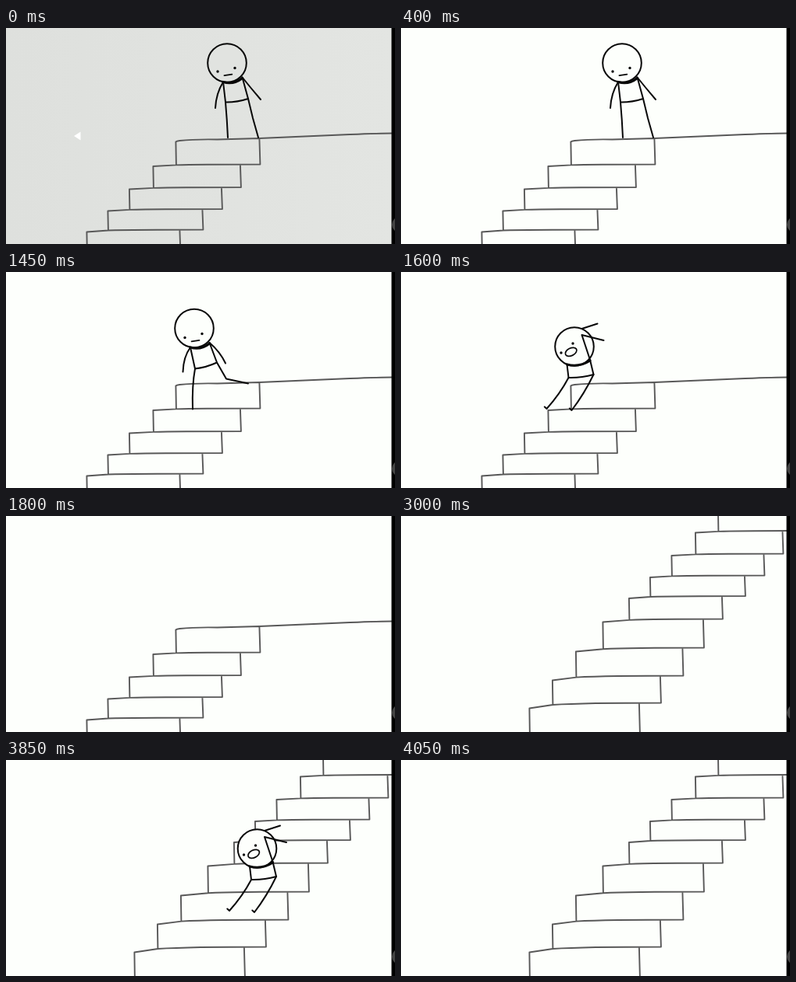
Animation of 498 by 278 pixels, one loop 4500 ms. Source, as an HTML page with a canvas:

```html
<!DOCTYPE html>
<html lang="en">
<head>
<meta charset="utf-8">
<title>Falling down the stairs</title>
<style>
html, body { margin: 0; width: 100%; height: 100%; overflow: hidden; background: #fdfffc; }
canvas { display: block; width: 498px; height: 278px; }
</style>
</head>
<body>
<canvas id="stage"></canvas>
<script>
const W = 498, H = 278, LOOP = 4500, INK = '#080808';
const canvas = document.getElementById('stage');
const ctx = canvas.getContext('2d');
const dpr = window.devicePixelRatio || 1;
canvas.width = W * dpr;
canvas.height = H * dpr;

// Front corner of each step: left, top, right. The camera pans down the same flight.
const corners = [
  [217, 146, 324], [188, 177.5, 299.5], [157.5, 207, 275.5], [130, 235, 251], [103, 262, 222],
  [69.5, 292.5, 198], [35, 330.5, 171.5], [5, 367.5, 143], [-24.5, 403.5, 116]
];
const PAN = [188.5, -156.5];

function buildStairs() {
  const path = new Path2D('M217 146Q218 145 222 144.5Q240 142.500 270 143L324 141.500Q400 138 440 136.500T494 135');
  corners.forEach(([left, top, right], i) => {
    const tilt = n => Math.max(2.5, n - 1);
    const below = corners[i + 1] ? corners[i + 1][1] : top + 40;
    path.moveTo(left + .5, below - tilt(i + 1) * .65);
    path.lineTo(left, top);
    if (i) {
      const [prevLeft, , prevRight] = corners[i - 1];
      path.lineTo(prevLeft + .5, top - tilt(i) * .65);
      path.quadraticCurveTo((left + right) / 2, top - tilt(i), prevRight + 1, top - tilt(i));
    }
    path.moveTo(right, top - (i ? tilt(i) * .8 : 4));
    path.lineTo(right + 1, below - tilt(i + 1));
  });
  return path;
}
const stairs = buildStairs();

// Points relative to the head: eyes, shoulders, hips, then middle and end of each limb.
const shoulders = [-5, 24.5, 19.5, 18.5];
const stand = { head: [283, 45], parts: [
  [-12, 11, 10, 6.5], shoulders, [-2, 50.5, 27, 46],
  [-14, 39, -15, 58], [31, 33, 43, 47], [0, 73, 1, 96], [33, 71, 40, 96]] };
const stepDown = { head: [242, 71], parts: [
  [-12, 12, 10, 7], shoulders, [1, 52, 29, 44],
  [-14, 37, -14.5, 56], [33, 30, 40, 45], [-3, 74, -2, 104], [41, 65, 69, 71]] };
const slide = { head: [321.5, 114], sliding: true, parts: [
  [-17, 8, -2, -4], [-9.5, 23, 20, 17], [-7.5, 40, 24.5, 36],
  [9.5, -23, 29.5, -29.5], [9.5, -15, 37.5, -8], [-18.5, 61, -35.5, 80], [12.5, 61, -3.5, 82]] };

const lerp = (a, b, k) => a.map((v, i) => v + (b[i] - v) * k);
const mix = (a, b, k) => ({
  head: lerp(a.head, b.head, k),
  sliding: b.sliding && k > .5,
  parts: a.parts.map((p, i) => lerp(p, b.parts[i], k))
});
const at = (pose, x, y) => ({ ...pose, head: [x, y] });

// Share of count even jumps made, the first at from and the last at to.
function jumps(t, from, to, count) {
  const done = Math.floor((t - from) / (to - from) * (count - 1)) + 1;
  return Math.min(Math.max(done / count, 0), 1);
}

function stroke(path, width = 2, color = INK) {
  ctx.lineWidth = width;
  ctx.strokeStyle = color;
  ctx.stroke(path);
}

function circle(x, y, r) {
  const path = new Path2D();
  path.arc(x, y, r, 0, Math.PI * 2);
  return path;
}

function limb(x, y, [mx, my, ex, ey], curved, toe) {
  const path = new Path2D(`M${x} ${y}${curved ? 'Q' : 'L'}${mx} ${my} ${ex} ${ey}`);
  if (toe) path.lineTo(ex - 2.7, ey - 2.5);
  stroke(path);
}

function drawFace([lx, ly, rx, ry], sliding) {
  ctx.fillStyle = INK;
  ctx.fill(circle(lx, ly, 1.7));
  ctx.fill(circle(rx, ry, 1.7));
  const tilt = Math.atan2(ry - ly, rx - lx);
  const x = (lx + rx) / 2 + Math.cos(tilt) - 7 * Math.sin(tilt);
  const y = (ly + ry) / 2 + Math.sin(tilt) + 7 * Math.cos(tilt);
  const mouth = new Path2D();
  mouth.ellipse(x, y, sliding ? 7.8 : 5, sliding ? 4.8 : 0, tilt * .7, 0, Math.PI * 2);
  stroke(mouth, 1.8);
}

function drawFigure({ head, parts, sliding }, paper, turn = 0) {
  const [eyes, [ax, ay, bx, by], [cx, cy, dx, dy], armL, armR, legL, legR] = parts;
  ctx.save();
  ctx.translate(head[0], head[1] + 25);
  ctx.rotate(turn);
  ctx.translate(0, -25);

  limb(ax, ay, armL, !sliding);
  const shirt = new Path2D(
    `M${ax} ${ay}L${cx} ${cy}Q${(cx + dx) / 2} ${(cy + dy) / 2 + 2.5} ${dx} ${dy}L${bx} ${by}`);
  const skull = circle(0, 0, 24.8);
  for (const shape of [shirt, skull]) {
    ctx.fillStyle = paper(head[0]);
    ctx.fill(shape);
    stroke(shape);
  }
  stroke(new Path2D(`M${ax} ${ay}Q${(ax + bx) / 2 + 1} ${ay + 4} ${bx} ${by + 1}`), 3.2);
  limb(bx, by, armR, !sliding);
  limb(cx, cy, legL, true, sliding);
  limb(dx, dy, legR, sliding, sliding);
  drawFace(eyes, sliding);
  ctx.restore();
}

function drawActor(t, paper) {
  const [sx, sy] = stepDown.head;
  const slip = at(stepDown, sx - 1, sy + 1.5);
  if (t < 1450) {
    drawFigure(mix(stand, stepDown, jumps(t, 550, 700, 3)), paper);
  } else if (t < 1600) {
    drawFigure(mix(slip, at(slide, 231, 90), t < 1550 ? 0 : .45), paper);
  } else if (t < 1800) {
    const n = Math.floor((t - 1600) / 50);
    drawFigure(at(slide, 222 - 33 * n - 2 * n * n, 96 + 34 * n + 3 * n * n), paper, Math.sin(n * 1.6) * .12);
  } else if (t >= 3700 && t < 4050) {
    const n = Math.floor((t - 3850) / 50);
    const [x, y] = slide.head;
    drawFigure(at(slide, x - 47.3 * n - 2.44 * n * n, y + 43 * n + 1.7 * n * n), paper, Math.sin(n * 1.6) * .12);
  }
}

function draw(t) {
  ctx.setTransform(dpr, 0, 0, dpr, 0, 0);
  ctx.lineCap = ctx.lineJoin = 'round';

  const light = jumps(t, 50, 400, 5);
  const paper = x => {
    const grey = 222 + 5 * x / W;
    return `rgb(${lerp([grey, grey + 2, grey - 1], [253, 255, 252], light).map(Math.round)})`;
  };
  const wash = ctx.createLinearGradient(0, 0, W, 0);
  wash.addColorStop(0, paper(0));
  wash.addColorStop(1, paper(W));
  ctx.fillStyle = wash;
  ctx.fillRect(0, 0, W, H);
  ctx.fillStyle = `rgba(255,255,255,${1 - light})`;
  ctx.fill(new Path2D('M87 139L95.500 133.500V144.500Z'));

  ctx.save();
  ctx.translate(.4, .5);
  if (t >= 3000) ctx.translate(...PAN);
  stroke(stairs, 1.9, '#585858');
  ctx.restore();
  drawActor(t, paper);

  ctx.fillStyle = '#000';
  ctx.fillRect(493.5, 0, 5, H);
  ctx.fillStyle = '#444';
  ctx.fill(circle(504, 253, 10));
}

const start = performance.now();
function tick() {
  draw((performance.now() - start) % LOOP);
  requestAnimationFrame(tick);
}
tick();
</script>
</body>
</html>
```
